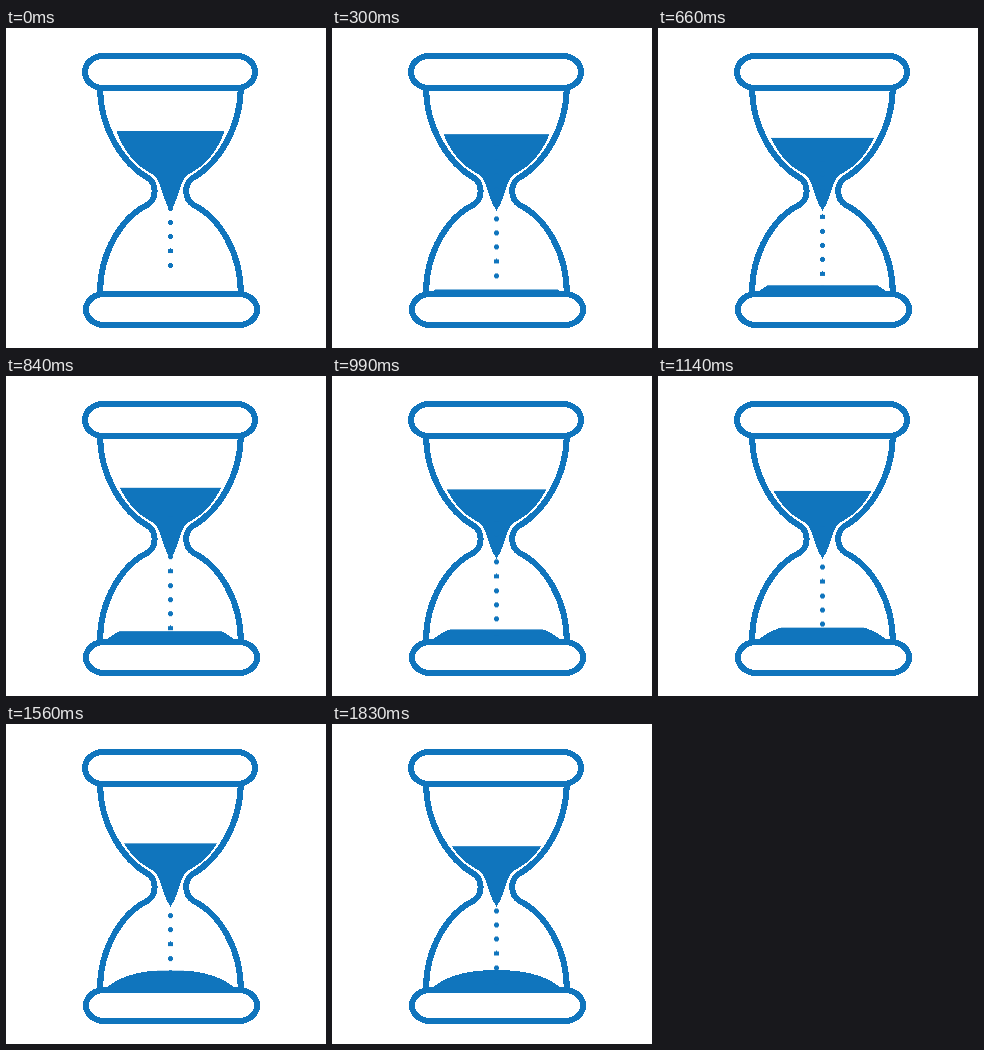
These frames come from a looping animation (320x320 px, 1.86 s). An HTML page:

```html
<!DOCTYPE html>
<html lang="en">
<head>
<meta charset="utf-8">
<title>Hourglass</title>
<style>
  html, body { margin: 0; width: 100%; height: 100%; overflow: hidden; background: #fff; }
  svg { display: block; width: 100vw; height: 100vh; shape-rendering: crispEdges; }
  .line { fill: none; stroke: #1075bd; stroke-width: 6; }
  .bar { fill: #fff; }
  .sand { fill: #1075bd; }
  .cover { fill: #fff; }
  .drops { stroke: #1075bd; stroke-width: 5; stroke-linecap: round; stroke-dasharray: 0 14.25; }
  .move { animation: shift 1860ms steps(62, end) infinite; }
  .drain { --dy: 19.5px; }
  .fill { --dy: -21.8px; }
  .fall { --dy: 64.5px; }
  @keyframes shift {
    from { transform: translateY(0); }
    to { transform: translateY(var(--dy)); }
  }
</style>
</head>
<body>
<svg viewBox="0 0 320 320">
  <defs>
    <path id="side" d="M94 60C94.5 100 116 135 142 150C151 156 151 171 141 177C115 190 94 225 94 265"/>
    <clipPath id="inside"><rect x="90" y="60" width="150" height="206"/></clipPath>
  </defs>

  <!-- Sand, trimmed by sliding white covers -->
  <g clip-path="url(#inside)">
    <path class="sand" d="M109.5 100C116 122 130 138 146 146C153 150 154 158 157 167C159 173.500 161.800 179 164.500 183C167.200 179 170 173.500 172 167C175 158 176 150 183 146C199 138 213 122 219.500 100Z"/>
    <path class="sand" d="M100 265V264C116 250 140 246 164.500 246S213 250 229 264V265Z"/>
    <rect class="cover move drain" x="90" y="60" width="150" height="42.6"/>
    <rect class="cover move fill" x="90" y="230" width="150" height="35"/>
    <path class="drops move fall" d="M164.500 237.200V108.500"/>
  </g>

  <!-- Glass and caps -->
  <g class="line">
    <use href="#side"/>
    <use href="#side" transform="matrix(-1 0 0 1 328.8 0)"/>
  </g>
  <rect class="line bar" x="79" y="28" width="170" height="32" rx="18" ry="16"/>
  <rect class="line bar" x="80" y="266" width="171" height="31" rx="18" ry="15.5"/>
</svg>
</body>
</html>
```
